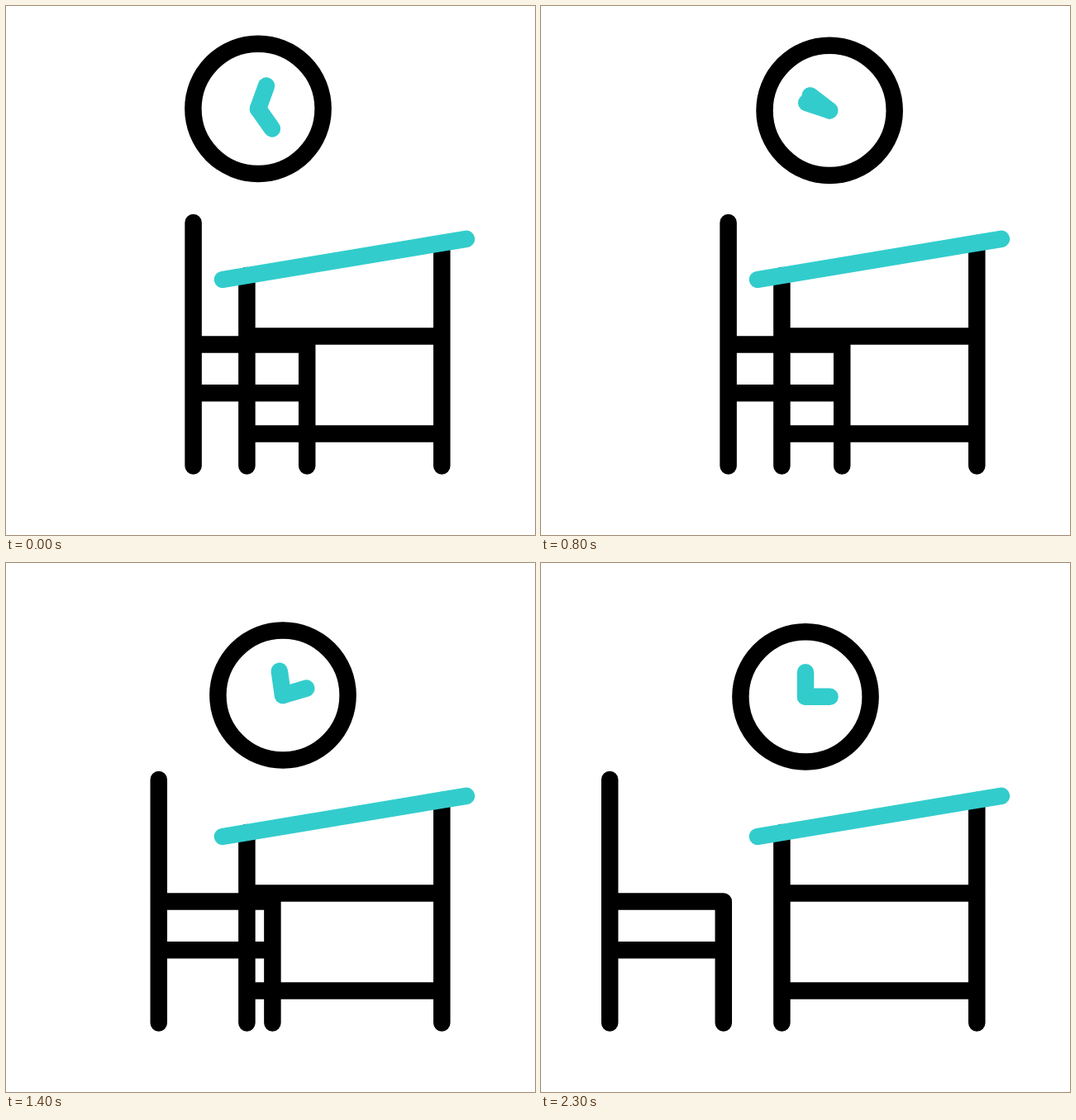
An HTML page for the animation above (2400 ms loop, 640 by 640 pixels).

```html
<!DOCTYPE html>
<html lang="en">
<head>
<meta charset="utf-8">
<title>Desk, chair and clock</title>
<style>
  html, body { margin: 0; width: 100%; height: 100%; overflow: hidden; background: #fff; }
  svg { display: block; width: 100vw; height: 100vh; }
  g { fill: none; stroke: #000; stroke-width: 20.5; stroke-linecap: round; stroke-linejoin: round; }
  .accent { stroke: #3cc; }
</style>
</head>
<body>
<svg viewBox="0 0 640 640">
  <g>
    <path d="M291.4 326.1V556.5M527.3 286.9V556.5M291.4 399.5H527.3M291.4 517.4H527.3"/>
    <path id="chair" d="M83.2 262V556.5M83.2 409.5H220.8V556.5M83.2 468.3H220.8"/>
    <path class="accent" d="M262 331L557 281.8"/>
    <g id="clock">
      <circle r="78.6"/>
      <g class="accent">
        <path id="slow" d="M0 0V-29.5"/>
        <path id="fast" d="M0 0V-29.5"/>
      </g>
    </g>
  </g>
</svg>
<script>
const LOOP = 2400, STEP = 100;
const [chair, clock, slow, fast] =
  ["chair", "clock", "slow", "fast"].map(id => document.getElementById(id));

// Clock path: time, x, y, x speed, y speed (px per ms)
const path = [
  [0, 305, 124.3, 0.085, -0.035],
  [400, 333.4, 117.4, 0.055, 0.0025],
  [800, 349.1, 126.4, 0.015, 0.042],
  [1200, 345.7, 151.1, -0.038, 0.05],
  [1400, 335, 160, -0.052, 0.018],
  [1700, 320, 161.8, 0, 0]
];

const clamp = v => Math.min(1, Math.max(0, v));
const smooth = u => u * u * (3 - 2 * u);

// Symmetric cubic-bezier(a, 0, 1 - a, 1)
function ease(x, a) {
  let lo = 0, hi = 1;
  for (let i = 0; i < 24; i++) {
    const u = (lo + hi) / 2, v = 1 - u;
    if (u * (3 * a * v * v + 3 * (1 - a) * v * u + u * u) < x) lo = u;
    else hi = u;
  }
  return smooth(lo);
}

function hermite(p0, p1, m0, m1, h, u) {
  const s = smooth(u), v = 1 - u;
  return p0 + (p1 - p0) * s + h * u * v * (m0 * v - m1 * u);
}

function clockAt(t) {
  const i = path.findIndex(p => p[0] > t);
  if (i < 0) return path[path.length - 1].slice(1, 3);
  const a = path[i - 1], b = path[i], h = b[0] - a[0], u = (t - a[0]) / h;
  return [1, 2].map(k => hermite(a[k], b[k], a[k + 2], b[k + 2], h, u));
}

function draw() {
  const t = Math.floor(performance.now() % LOOP / STEP) * STEP;
  const slide = 143.4 * (1 - smooth(clamp((t - 900) / 1400)));
  const left = ease(clamp((1700 - t) / 3030), 0.377);
  chair.setAttribute("transform", `translate(${slide} 0)`);
  clock.setAttribute("transform", `translate(${clockAt(t)})`);
  slow.setAttribute("transform", `rotate(${-360 * left})`);
  fast.setAttribute("transform", `rotate(${90 - 720 * left})`);
  requestAnimationFrame(draw);
}
draw();
</script>
</body>
</html>
```
